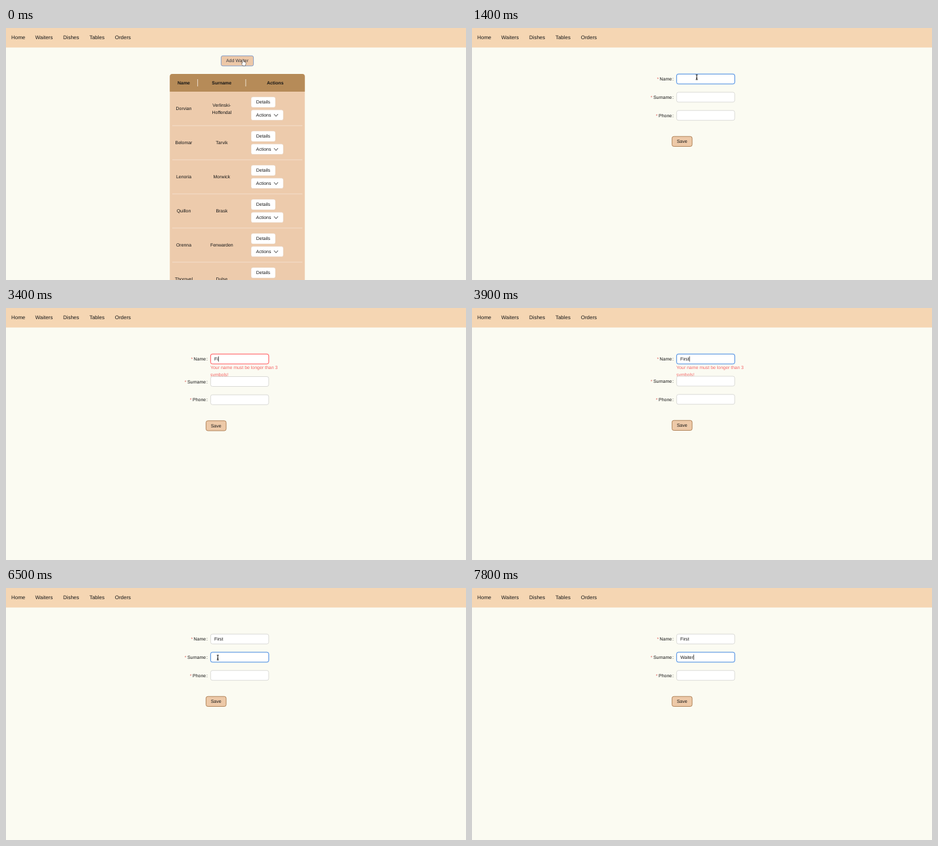
An HTML page with a canvas that plays this animation: 700 px wide and 384 px high, repeating every 8 s.

```html
<!DOCTYPE html>
<html lang="en">
<head>
<meta charset="utf-8">
<title>Waiter form</title>
<style>
html, body { margin: 0; width: 100%; height: 100%; overflow: hidden; background: #fbfbf2; }
canvas { display: block; width: 700px; height: 384px; }
</style>
</head>
<body>
<canvas id="stage" width="700" height="384"></canvas>
<script>
const ctx = document.getElementById('stage').getContext('2d');
const LOOP = 8000, STEP = 100, SIZE = 6.94;
const FONT = '"Liberation Sans", Arial, sans-serif';
const BLUE = [74, 140, 220], RED = [255, 90, 92];

const clamp = v => Math.max(0, Math.min(1, v));
const lerp = (a, b, p) => a + (b - a) * p;
const ease = p => p * p * (3 - 2 * p);
const progress = (t, from, to) => clamp((t - from) / (to - from));
const mix = (a, b, p) => `rgb(${a.map((v, i) => Math.round(lerp(v, b[i], p)))})`;

function text(str, x, y, { size = SIZE, color = '#161616', align = 'left', weight = '' } = {}) {
  ctx.font = `${weight} ${size}px ${FONT}`;
  ctx.textRendering = 'geometricPrecision';
  ctx.textAlign = align;
  ctx.fillStyle = color;
  ctx.fillText(str, x, y + size * 0.36);
}

function textWidth(str) {
  ctx.font = `${SIZE}px ${FONT}`;
  return ctx.measureText(str).width;
}

function box(x, y, w, h, radius, fill, stroke, line = 0.8) {
  ctx.beginPath();
  ctx.roundRect(x, y, w, h, radius);
  ctx.fillStyle = fill;
  ctx.fill();
  if (!stroke) return;
  ctx.strokeStyle = stroke;
  ctx.lineWidth = line;
  ctx.stroke();
}

function outline(points, fill, stroke, line) {
  ctx.beginPath();
  points.forEach(([x, y]) => ctx.lineTo(x, y));
  if (fill) {
    ctx.closePath();
    ctx.fillStyle = fill;
  }
  ctx.strokeStyle = stroke;
  ctx.lineWidth = line;
  ctx.lineJoin = 'round';
  ctx.stroke();
  if (fill) ctx.fill();
}

function drawNav() {
  ctx.fillStyle = '#fbfbf2';
  ctx.fillRect(0, 0, 700, 384);
  ctx.fillStyle = '#f5d6b3';
  ctx.fillRect(0, 0, 700, 29.7);
  const items = { Home: 8, Waiters: 44.6, Dishes: 87, Tables: 127, Orders: 165.8 };
  for (const [name, x] of Object.entries(items)) text(name, x, 14.6, { size: 7.93 });
}

// Waiter list

const people = [
  ['Dorvian', 'Verlinski-', 'Hoffendal'], ['Belomar', 'Tarvik'], ['Lenoria', 'Morwick'],
  ['Quillon', 'Brask'], ['Orenna', 'Fenwarden'], ['Thornvel', 'Dulse']
];

function drawRow([name, ...surname], i) {
  const y = 123 + i * 52;
  const center = { align: 'center' };
  text(name, 270.5, y, center);
  surname.forEach((part, k) => text(part, 328.3, y + (k - (surname.length - 1) / 2) * 10.9, center));
  box(373, y - 18, 37, 16, 2.8, '#fff', '#e3cdb8', 0.5);
  text('Details', 391.4, y - 10, center);
  box(373, y + 1.8, 49, 15.8, 2.8, '#fff', '#e3cdb8', 0.5);
  text('Actions', 380.6, y + 9.7);
  outline([[408, y + 8.2], [410.9, y + 11.6], [413.8, y + 8.2]], null, '#222', 0.9);
  ctx.fillStyle = '#f3dfcd';
  ctx.fillRect(253, y + 25.4, 198, 0.9);
}

function drawList() {
  box(327.4, 42.4, 49.2, 15.4, 2.5, '#edc8a8', '#6f8fc4');
  text('Add Waiter', 352, 50, { align: 'center', color: '#34363f' });
  box(249.3, 70, 205.4, 330, [4, 4, 0, 0], '#edcbac');
  box(249.3, 70, 205.4, 27, [4, 4, 0, 0], '#b68b58');
  ctx.fillStyle = '#f0e4d4';
  for (const x of [291.2, 364.4]) ctx.fillRect(x, 78, 0.9, 11);
  const head = { align: 'center', weight: 'bold' };
  text('Name', 270.5, 83.3, head);
  text('Surname', 328.2, 83.3, head);
  text('Actions', 409.6, 83.3, head);
  people.forEach(drawRow);
}

// Form

const fields = [
  { label: 'Name', focus: 900, blur: 5000, word: 'First', keys: [3100, 3300, 3500, 3800, 3900], caretOff: [[1400, 1900], [2500, 3000], [4400, 4900]] },
  { label: 'Surname', focus: 5000, blur: LOOP, word: 'Waiter', keys: [6600, 6800, 7000, 7400, 7700, 7800], caretOff: [[5500, 6000], [6500, 6600]] },
  { label: 'Phone', focus: LOOP, blur: LOOP, word: '', keys: [] }
];

function errorHeight(t, { keys }) {
  if (!keys.length) return 0;
  const opening = 22 * ease(progress(t, keys[0], keys[0] + 400));
  const closing = progress(t, keys[3], keys[3] + 200);
  return closing < 1 ? opening * (1 - 0.72 * closing * closing) : 0;
}

function drawError(y, height) {
  ctx.save();
  ctx.beginPath();
  ctx.rect(305, y, 120, height);
  ctx.clip();
  ctx.globalAlpha = clamp(height / 20);
  text('Your name must be longer than 3', 311, y + 5, { color: '#f4575a' });
  text('symbols!', 311, y + 15.6, { color: '#f4575a' });
  ctx.restore();
}

function drawField(field, t, y) {
  const { label, focus, blur, word, keys } = field;
  const left = 304.1 - textWidth(label);
  text('*', left - 4.2, y, { color: '#d8615c' });
  text(label, left, y);
  text(':', 305.1, y);

  const height = errorHeight(t, field);
  if (height > 0) drawError(y + 8, height);

  const focused = t >= focus && t < blur;
  if (focused) {
    const red = keys.length ? progress(t, keys[0], keys[0] + 200) * (1 - progress(t, keys[3], keys[3] + 100)) : 0;
    box(310.4, y - 8.4, 90.4, 16.8, 3.4, mix([218, 232, 250], [255, 226, 224], red));
    box(311.4, y - 7.5, 88.4, 15, 2.8, '#fff', mix(BLUE, RED, red), 0.95);
  } else {
    box(311.4, y - 7.5, 88.4, 15, 2.8, '#fff', '#d3d3d0', 0.8);
  }

  const typed = word.slice(0, keys.filter(key => t >= key).length);
  text(typed, 317, y);
  if (focused && !field.caretOff.some(([from, to]) => t >= from && t < to)) {
    ctx.fillStyle = '#222';
    ctx.fillRect(317.1 + textWidth(typed), y - 4, 0.8, 8);
  }
}

function drawForm(t) {
  let y = 77.7;
  for (const field of fields) {
    drawField(field, t, y);
    y += 27.75 + Math.max(0, errorHeight(t, field) - 12);
  }
  const top = y + 4.3;
  box(304.4, top, 30.6, 15.2, 2.8, '#edc9a8', '#ac7d52', 0.9);
  text('Save', 319.6, top + 7.5, { align: 'center' });
}

function drawStatus() {
  box(0, 374, 89.3, 11, [0, 3, 0, 0], '#141414');
  text('localhost:3000/waiters/create', 2.2, 379.2, { size: 6.45, color: '#e8e8e8' });
}

// Pointer

const shift = (points, x, y) => points.map(([px, py]) => [px + x, py + y]);

function drawArrow(x, y) {
  const shape = [[0, 0], [0, 6.6], [1.5, 5.3], [2.5, 7.6], [3.5, 7.1], [2.5, 4.9], [4.4, 4.8]];
  outline(shift(shape, x - 0.3, y - 3.4), '#111', '#fff', 0.9);
}

function drawHand(x, y) {
  const shape = [[-1.2, -4.4], [-0.2, -4.4], [0.1, -1.4], [3.4, -0.5], [3.5, 2], [2.6, 4.6], [-0.6, 4.6], [-3, 0.9], [-2.4, 0.3], [-1.2, 1.2]];
  outline(shift(shape, x + 0.3, y), '#fff', '#1c1c1c', 0.9);
}

function drawBeam(x, y) {
  const bar = (dy, w) => outline([[x - w, y + dy], [x + w, y + dy]], null, '#111', 0.9);
  outline([[x, y - 3.6], [x, y + 3.6]], null, '#111', 1);
  bar(-3.7, 1.5);
  bar(3.7, 1.5);
  bar(1.6, 1);
}

function drawPointer(t) {
  const hidden = (t >= 3100 && t < 4400) || t >= 6600;
  if (hidden) return;
  const first = ease(progress(t, 300, 900));
  const second = ease(progress(t, 4300, 5000));
  const x = lerp(lerp(361, 342, first), 322.3, second);
  const y = lerp(lerp(53, 75, first), 106, second);
  const overInput = x > 311 && x < 400 && ((y > 70 && y < 85.5) || (y > 97.5 && y < 113.5));
  if (t < 100) drawHand(x, y);
  else if (overInput) drawBeam(x, y);
  else drawArrow(x, y);
}

function render(now) {
  const t = Math.floor((now % LOOP) / STEP) * STEP;
  drawNav();
  if (t < 100) drawList();
  else drawForm(t);
  if (t >= 100 && t < 600) drawStatus();
  drawPointer(t);
}

let start;
function tick(now) {
  start ??= now;
  render(now - start);
  requestAnimationFrame(tick);
}
render(0);
requestAnimationFrame(tick);
</script>
</body>
</html>
```
